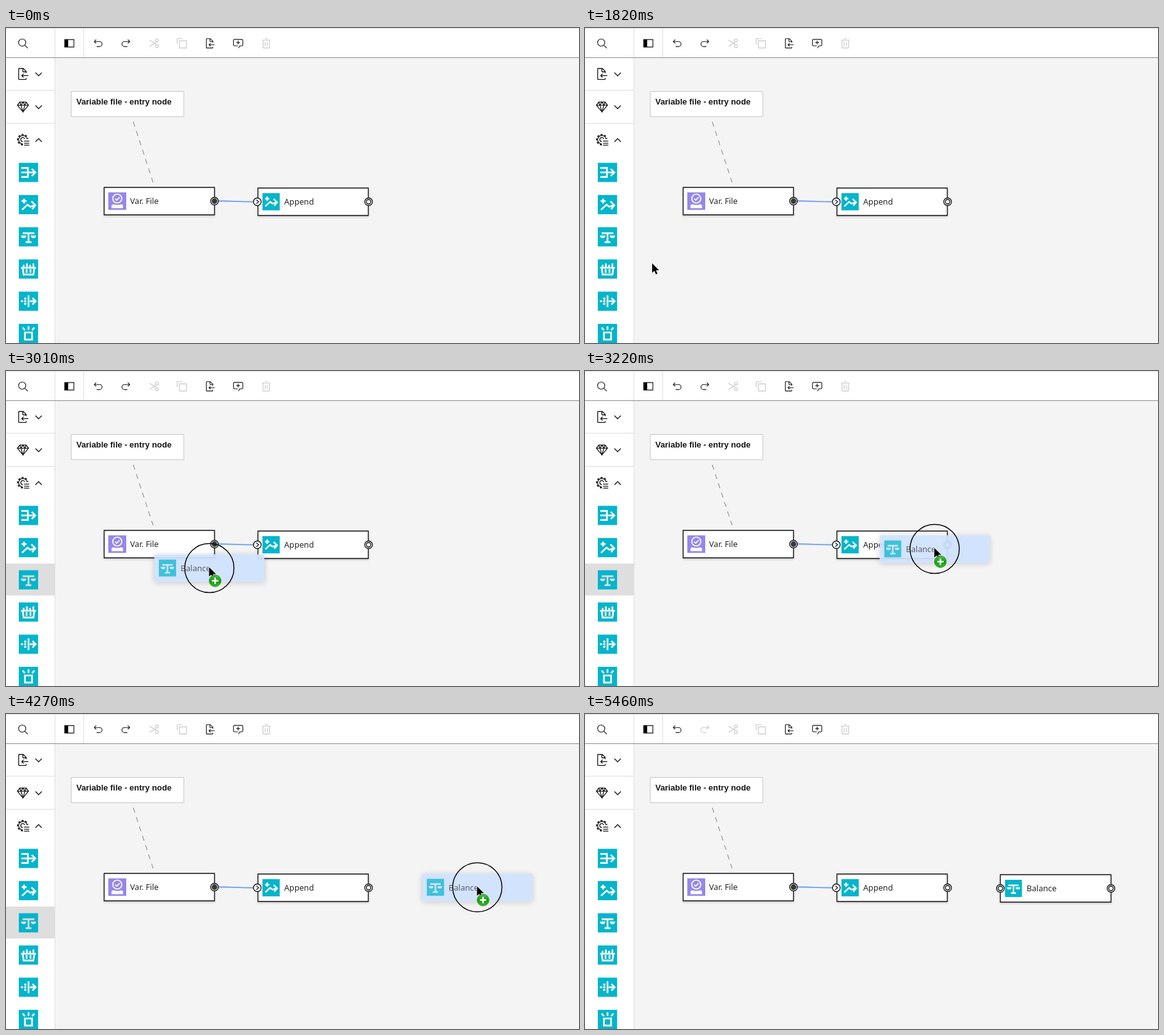
Recreate the animation shown at these times as an HTML page. Size 896x494 px, loop 6.09 s.

```html
<!DOCTYPE html>
<html lang="en">
<head>
<meta charset="utf-8">
<title>Flow editor</title>
<style>
  html, body { margin: 0; width: 100%; height: 100%; overflow: hidden; background: #f4f4f4; }
  svg { display: block; }
  .line { fill: none; stroke: currentColor; stroke-width: 2; }
  .white { fill: none; stroke: var(--glyph, #fff); stroke-width: 2.6; }
  .solid { fill: var(--glyph, #fff); stroke: none; }
  .tile { fill: #04b5cb; }
  .off { color: #c6c6c6; }
  .rule { stroke: #dedede; }
  .box { fill: #fff; stroke: #161616; stroke-width: 1.4; filter: url(#soft); }
  .port { fill: #fff; stroke: #161616; stroke-width: 1.4; }
  .label { font: 12.7px "Noto Sans", sans-serif; fill: #262626; }
  .note { font: bold 12.9px "Liberation Sans", Arial, sans-serif; fill: #161616; }
</style>
</head>
<body>
<svg width="896" height="494" viewBox="0 0 896 494" color="#161616">
  <defs>
    <filter id="soft" x="-10%" y="-25%" width="120%" height="160%">
      <feDropShadow dx="0" dy="1.5" stdDeviation="1.6" flood-opacity=".2"/>
    </filter>
    <filter id="halo" x="-15%" y="-45%" width="130%" height="190%">
      <feDropShadow dx="0" dy="1.5" stdDeviation="5" flood-opacity=".2"/>
    </filter>
    <linearGradient id="green" x2="0" y2="1">
      <stop stop-color="#55bd48"/><stop offset=".5" stop-color="#189a12"/><stop offset="1" stop-color="#38b82b"/>
    </linearGradient>

    <symbol id="search" viewBox="0 0 32 32"><g class="line"><circle cx="13" cy="13" r="10"/><path d="M20.5 20.5l8 8"/></g></symbol>
    <symbol id="panel" viewBox="0 0 32 32"><path class="line" d="M4 6h24v20H4z"/><path d="M4 6h9v20H4z"/></symbol>
    <symbol id="undo" viewBox="0 0 32 32"><path class="line" d="M10.7 5.7L5.4 11l5.3 5.3M6 11h14a7 7 0 0 1 0 14h-8"/></symbol>
    <symbol id="cut" viewBox="0 0 32 32"><g class="line"><circle cx="24" cy="8" r="4"/><circle cx="24" cy="24" r="4"/><path d="M3.5 7.5L22 18.4M3.5 24.5L22 13.6"/></g></symbol>
    <symbol id="copy" viewBox="0 0 32 32"><path class="line" d="M10 9h18q1 0 1 1v18q0 1-1 1H10q-1 0-1-1V10q0-1 1-1zM3 18V4q0-1 1-1h14"/></symbol>
    <symbol id="import" viewBox="0 0 32 32"><path class="line" d="M23 14V10l-7-7H6q-1 0-1 1v24q0 1 1 1h16q1 0 1-1v-2M15 3v7q0 1 1 1h7M28 20H13M16.7 15.7L12.4 20l4.3 4.3"/></symbol>
    <symbol id="comment" viewBox="0 0 32 32"><path class="line" d="M17 29.5l3.6-6.5H26a3 3 0 0 0 3-3V8a3 3 0 0 0-3-3H6a3 3 0 0 0-3 3v12a3 3 0 0 0 3 3h9M16 9v10M11 14h10"/></symbol>
    <symbol id="trash" viewBox="0 0 32 32"><path class="line" d="M4 7h24M12 3h8M7 7v21q0 1 1 1h16q1 0 1-1V7M13 12v12M19 12v12"/></symbol>
    <symbol id="gem" viewBox="0 0 32 32"><path class="line" d="M8 4h16l6 8-14 17L2 12zM2 12h28M8 4l3 8 5 17 5-17 3-8M11 12l5-8 5 8"/></symbol>
    <symbol id="gear" viewBox="0 0 32 32"><g class="line">
      <path d="M15 26A10.5 10.5 0 1 1 25.2 13.5M15 20a5 5 0 1 1 4.5-6.5"/>
      <path d="M15 28.3A12.8 12.8 0 1 1 27.4 13.5" stroke-width="3" stroke-dasharray="5 4.3"/>
      <path d="M18 19h13M18 24h13M18 29h13"/></g></symbol>
    <symbol id="chevron" viewBox="0 0 12 12"><path d="M1 3.5l5 5 5-5" fill="none" stroke="#161616" stroke-width="1.3"/></symbol>

    <symbol id="merge" viewBox="0 0 30 30"><path class="tile" d="M0 0h30v30H0z"/><path class="white" d="M4 8h10v14H4M4 15h21M20 9.5l5.5 5.5-5.5 5.5"/></symbol>
    <symbol id="append" viewBox="0 0 30 30"><path class="tile" d="M0 0h30v30H0z"/><path class="white" d="M4.5 9.5h7.5M8.2 5.8v7.5M5 23l8.5-8 4 3.2L25 16M19.5 10l6 6-5 6"/></symbol>
    <symbol id="balance" viewBox="0 0 30 30"><path class="tile" d="M0 0h30v30H0z"/><path class="white" d="M6 9.5h18M15 8v15M10.5 23.2h9"/><path class="solid" d="M3.5 13h8a4 4 0 0 1-8 0zM18.5 13h8a4 4 0 0 1-8 0z"/></symbol>
    <symbol id="basket" viewBox="0 0 30 30"><path class="tile" d="M0 0h30v30H0z"/><path class="white" d="M3.5 13h23M6 13l1.5 10.5h15L24 13M12 15v6M18 15v6M7.5 8.5v4M12.5 6.5v6M17.5 8.5v4M22.5 6.5v6"/></symbol>
    <symbol id="split" viewBox="0 0 30 30"><path class="tile" d="M0 0h30v30H0z"/><path class="white" d="M15 6v18M17 15h9M21 10l5 5-5 5"/><g class="solid"><circle cx="5" cy="15" r="1.8"/><circle cx="10" cy="11" r="1.8"/><circle cx="10" cy="15" r="1.8"/><circle cx="10" cy="19" r="1.8"/></g></symbol>
    <symbol id="burst" viewBox="0 0 30 30"><path class="tile" d="M0 0h30v30H0z"/><path class="white" d="M9.5 13.5h11v11h-11zM15 4v5.5M6 6l3.5 4M24 6l-3.5 4"/></symbol>
    <symbol id="file" viewBox="0 0 28 28"><path fill="#9587ea" d="M0 0h28v28H0z"/><g fill="none" stroke="#fff" stroke-width="1.7"><circle cx="14" cy="10" r="7"/><path d="M10.5 10l2.6 2.6 4.6-4.8"/></g><path fill="#fff" d="M5 25v-3q0-3 3-3 6 2 12 0 3 0 3 3v3z"/></symbol>

    <g id="openPort"><circle r="6" class="port"/><circle r="3.5" class="port"/></g>
  </defs>

  <path fill="#f4f4f4" d="M0 0h896v494H0z"/>
  <path fill="#fff" d="M0 0h896v46H0zM0 46h76v448H0z"/>
  <path id="hover" fill="#dedede" d="M0 302h76v50H0z"/>
  <path class="rule" d="M0 .5h896M76.5 1v493M121.5 1v45M0 97.5h76M0 149.5h76"/>
  <path stroke="#8d8d8d" d="M0 46.5h896"/>
  <g id="toolbar"></g>
  <g id="palette"></g>

  <path d="M102 99.5h176v39.5H102z" fill="#fff" stroke="#c4c4c4"/>
  <text class="note" x="110" y="120">Variable file - entry node</text>
  <path d="M199 147L230 242" stroke="#8d8d8d" stroke-width="1.1" stroke-dasharray="8 7.4"/>

  <g>
    <path class="box" d="M153.5 250h172.5v43H153.5z"/>
    <use href="#file" x="160" y="257.5" width="28" height="28"/>
    <text class="label" x="194" y="276">Var. File</text>
  </g>
  <g>
    <path class="box" d="M394 251h172.500v43H394z"/>
    <use href="#append" x="401" y="259" width="27" height="27"/>
    <text class="label" x="435" y="277">Append</text>
    <use href="#openPort" x="567" y="272.500"/>
  </g>
  <path d="M331 271.200C362 271.200 356 272.500 388 272.500" fill="none" stroke="#6f9ff5" stroke-width="1.9"/>
  <g transform="translate(326 271.500)"><circle r="6" class="port"/><circle r="4.400" fill="#393939"/></g>
  <g transform="translate(393 272.500)"><circle r="6" class="port"/><path d="M-1.500-3L2 0-1.500 3" fill="none" stroke="#161616" stroke-width="1.200"/></g>

  <g id="dropped">
    <path class="box" d="M649.500 252h173v43h-173z"/>
    <use href="#balance" x="656.500" y="260" width="27" height="27"/>
    <text class="label" x="690.500" y="278">Balance</text>
    <use href="#openPort" x="649.500" y="273.500"/>
    <use href="#openPort" x="822.500" y="273.500"/>
  </g>

  <g id="pointer">
    <g id="ghost">
      <rect x="-86" y="-21.500" width="172" height="43" rx="2" fill="#d0e2ff" opacity=".93" filter="url(#halo)"/>
      <g opacity=".7" style="--glyph:#d8e8ff">
        <use href="#balance" x="-79" y="-13.500" width="27" height="27"/>
        <text class="label" x="-45" y="5">Balance</text>
      </g>
    </g>
    <circle id="ring" fill="none" stroke="#0a0a0a" stroke-width="1.500"/>
    <path d="M-.5-1.500V13.600l3.500-3.300 2.400 5.600 2.500-1.100-2.400-5.400h4.900z" fill="#000" stroke="#fff" stroke-width="1.200" paint-order="stroke"/>
    <g id="plus" transform="translate(9 20)">
      <circle r="9.300" fill="url(#green)" stroke="#1c8a17" stroke-width=".7"/>
      <path d="M-5 0H5M0-5V5" stroke="#fff" stroke-width="2.400"/>
    </g>
  </g>
</svg>
<script>
  const LOOP = 6090, STEP = 70;
  const el = id => document.getElementById(id);

  const icon = (name, x, y, size, attrs = '') =>
    `<use href="#${name}" x="${x - size / 2}" y="${y - size / 2}" width="${size}" height="${size}" ${attrs}/>`;

  el('toolbar').innerHTML = [
    icon('search', 27, 24.500, 18), icon('panel', 99, 24, 19), icon('undo', 144, 24, 18),
    `<g id="redo" transform="matrix(-1 0 0 1 374.500 0)">${icon('undo', 187, 24, 18)}</g>`,
    icon('cut', 231.500, 24, 18, 'class="off"'), icon('copy', 275, 24, 18, 'class="off"'),
    icon('import', 319.500, 24, 18), icon('comment', 363, 24, 18), icon('trash', 407, 24, 18, 'class="off"')
  ].join('');

  const tiles = ['merge', 'append', 'balance', 'basket', 'split', 'burst'];
  el('palette').innerHTML =
    icon('import', 27, 72, 21) + icon('gem', 26.500, 123.500, 20) + icon('gear', 27, 175.500, 20) +
    icon('chevron', 51, 72.500, 12) + icon('chevron', 51, 124, 12) +
    icon('chevron', 51, 176, 12, 'transform="rotate(180 51 176)"') +
    tiles.map((name, i) => icon(name, 35.200, 226.500 + i * 50.500, 30.500, `id="tile-${name}"`)).join('');

  // Pointer path: time, x, y
  const path = [
    [350, 382, 488], [770, 208, 440], [1540, 208, 440], [1820, 105.500, 370.500],
    [2170, 39, 328], [2240, 37, 326], [2660, 37, 326], [3010, 318, 309],
    [3290, 607, 272], [3500, 714.500, 265], [3920, 735, 271], [3990, 737, 271.700],
    [4410, 737, 271.700], [4620, 736, 273.500], [LOOP, 736, 273.500]
  ];

  const slope = (i, axis) => {
    const a = path[i], b = path[i + 1];
    return a && b ? (b[axis] - a[axis]) / (b[0] - a[0]) : 0;
  };
  // Harmonic tangents keep the curve smooth without overshoot.
  const tangent = (i, axis) => {
    const before = slope(i - 1, axis), after = slope(i, axis);
    if (i === 0) return after;
    return before * after > 0 ? 2 * before * after / (before + after) : 0;
  };
  function position(t, axis) {
    if (t <= path[0][0]) return path[0][axis];
    let i = 0;
    while (i < path.length - 2 && t >= path[i + 1][0]) i++;
    const a = path[i], b = path[i + 1], span = b[0] - a[0];
    const u = (t - a[0]) / span, v = 1 - u;
    return a[axis] * (1 + 2 * u) * v * v + b[axis] * u * u * (3 - 2 * u) +
      span * u * v * (tangent(i, axis) * v - tangent(i + 1, axis) * u);
  }

  const show = (id, on) => { el(id).style.display = on ? '' : 'none'; };
  const within = (t, from, to) => t >= from && t < to;
  const clamp = x => Math.max(0, Math.min(1, x));

  function render(now) {
    const t = Math.floor(now % LOOP / STEP) * STEP;
    const x = position(t, 1), y = position(t, 2);
    const dragging = within(t, 2730, 4760), dropped = t >= 4760;
    const hovered = within(t, 1610, 5320) && (x < 76 || t >= 2170);

    el('pointer').setAttribute('transform', `translate(${x} ${y})`);
    el('pointer').style.opacity = 1 - clamp((t - 5250) / 210);
    show('pointer', within(t, 350, 5460));
    show('ghost', dragging);
    show('plus', dragging);
    show('ring', within(t, 1120, 1400) || within(t, 2380, 4760));
    el('ring').setAttribute('r', 21.500 + 17 * clamp((t - 2660) / 140));

    show('hover', hovered);
    el('tile-balance').style.setProperty('--glyph', hovered ? '#dedede' : '#fff');
    show('dropped', dropped);
    el('redo').style.color = dropped ? '#c6c6c6' : '';
  }

  const start = performance.now();
  function tick() {
    render(performance.now() - start);
    requestAnimationFrame(tick);
  }
  tick();
</script>
</body>
</html>
```
